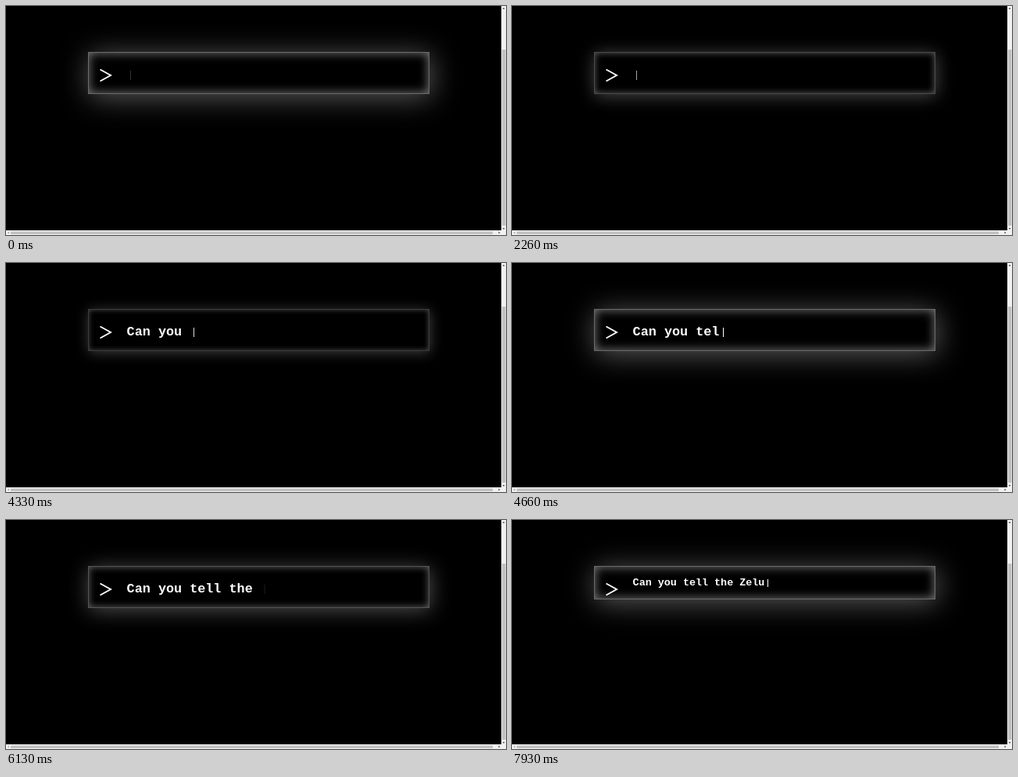
Write an HTML page that moves like this. It is 640 px wide and 294 px high and loops after 8000 ms.

```html
<!DOCTYPE html>
<html lang="en">
<head>
<meta charset="utf-8">
<title>Prompt</title>
<style>
  html, body { margin: 0; width: 100%; height: 100%; overflow: hidden; background: #000; }
  div, svg { position: absolute; box-sizing: border-box; }
  #box { left: 105px; top: 59px; width: 436.5px; border: 1.5px solid; }
  #text { left: 154.6px; color: #fff; font: bold 16.8px/20px "Liberation Mono", monospace; white-space: pre; }
  #caret { background: #fff; }
</style>
</head>
<body>
<div id="box"></div>
<div id="text"></div>
<div id="caret"></div>
<svg width="640" height="294">
  <path d="M120.5 81.5L134 89L120.5 96.5" fill="none" stroke="#fff" stroke-width="1.9"/>
  <path d="M634 0h6v294h-640v-6h634z" fill="#f1f1f1"/>
  <path d="M635 56h4.5v226h-4.5zM6 289.5h617v3.5h-617z" fill="#c1c1c1"/>
  <path d="M635.5 4l1.5-2 1.5 2zM635.5 285l1.5 2 1.5-2zM630.5 289.5l2 1.5-2 1.5z" fill="#505050"/>
  <path d="M4 289.5l-2 1.5 2 1.5z" fill="#a3a3a3"/>
</svg>
<script>
const LOOP = 8000;
const MESSAGE = "Can you tell the Zelu";
const [box, text, caret] = ["box", "text", "caret"].map(id => document.getElementById(id));

// Pairs of [time, value]
const KEYS = [[3250, 0], [3800, 4], [4300, 8], [4650, 11], [5200, 17], [7740, 17], [7915, 21]];
const GLOW = [[450, 1], [2260, .52], [2450, .42], [3860, .42], [4100, .28], [4340, .28], [4600, 1],
  [5530, 1], [6260, .58], [6800, .4], [7460, .3], [7760, .3], [7870, 1]];

function track(points, t) {
  if (t <= points[0][0]) return points[0][1];
  for (let i = 1; i < points.length; i++) {
    const [t0, v0] = points[i - 1], [t1, v1] = points[i];
    if (t <= t1) return v0 + (v1 - v0) * (t - t0) / (t1 - t0);
  }
  return points.at(-1)[1];
}

function fade(x) {
  x = Math.min(1, Math.max(0, x));
  return x * x * (3 - 2 * x);
}

function caretOpacity(t) {
  if ((t > 4400 && t < 5600) || t > 7590) return 1;
  const phase = t % 1000;
  const floor = t < 4400 ? .2 : 0;
  const lit = phase < 560 ? fade((phase - 80) / 340) : 1 - fade((phase - 560) / 250);
  return floor + (1 - floor) * lit;
}

function draw(now) {
  const t = now % LOOP;
  const count = Math.floor(track(KEYS, t) + 1e-6);
  const size = count > 17 ? 13.4 : 16.8;
  const middle = count > 17 ? 80.5 : 88.8;
  text.textContent = MESSAGE.slice(0, count);
  text.style.fontSize = size + "px";
  text.style.top = middle - 10 + "px";

  const scale = size / 16.8;
  Object.assign(caret.style, {
    left: 154.6 + size * .6 * (count + .5) - .7 + "px",
    top: middle - 6 * scale + "px",
    width: 1.5 * scale + "px",
    height: 12.5 * scale + "px",
    opacity: caretOpacity(t)
  });

  const glow = track(GLOW, t);
  const white = alpha => `rgba(255,255,255,${alpha})`;
  box.style.height = (count > 17 ? 42.5 : 53.5) + "px";
  box.style.borderColor = white(.16 + .26 * glow);
  box.style.boxShadow =
    `${2 * glow}px ${1 + 3 * glow}px ${8 + 28 * glow}px ${white(.2 + .16 * glow)},` +
    `inset 0 0 ${4 + 9 * glow}px ${white(.22 + .26 * glow)}`;
}

function tick() {
  draw(performance.now());
  requestAnimationFrame(tick);
}
tick();
</script>
</body>
</html>
```
